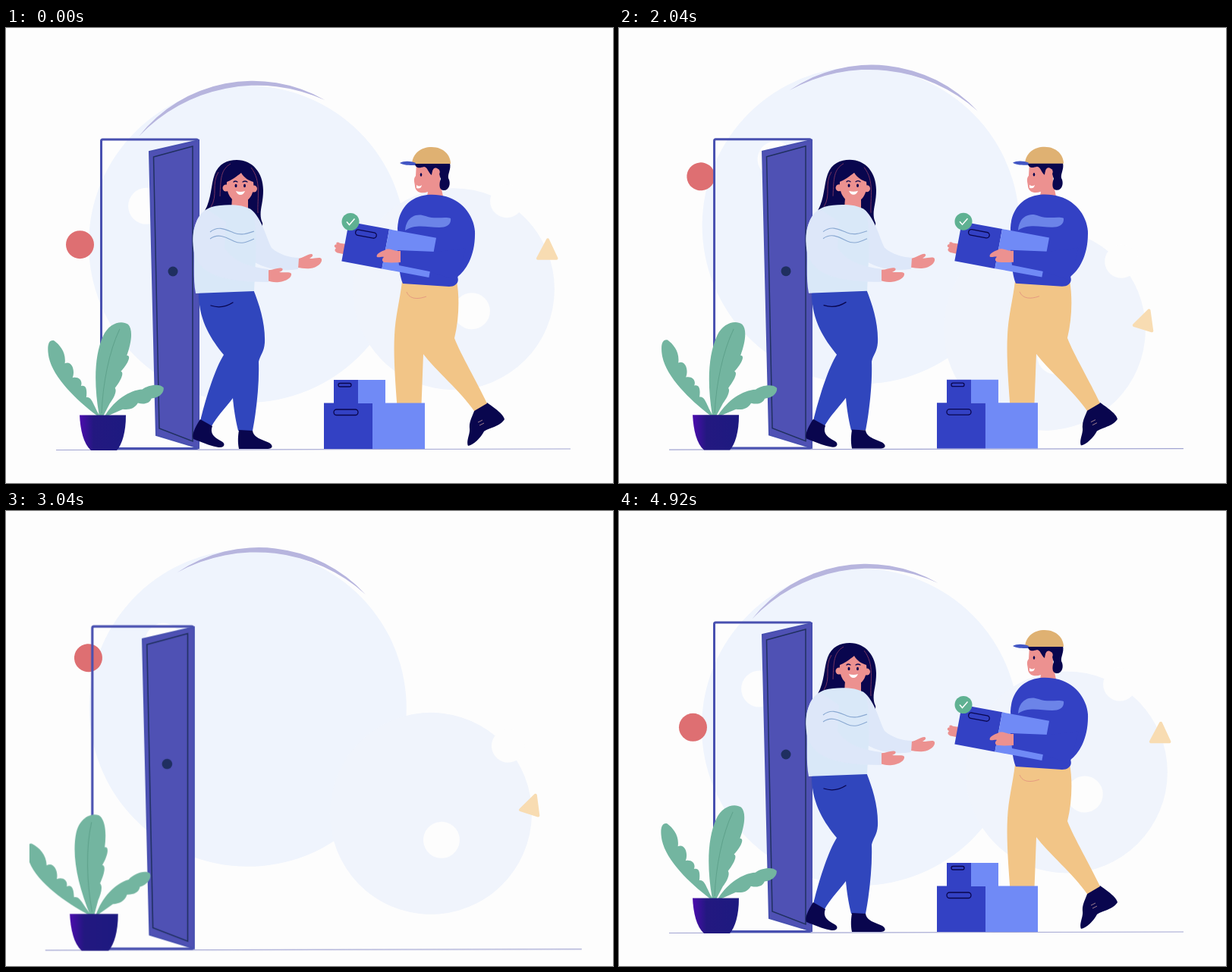
An HTML page for the animation above (4960 ms loop, 800x600 px).

```html
<!DOCTYPE html>
<html lang="en">
<head>
<meta charset="utf-8">
<title>Delivery at the door</title>
<style>
html, body { margin: 0; width: 100%; height: 100%; overflow: hidden; background: #fdfdfd; }
svg { display: block; width: 100%; height: 100%; }
.skin { fill: #ec9190; }
.navy { fill: #09064e; }
.line { fill: none; stroke: #09064e; stroke-width: 1.3; stroke-linecap: round; }
.leaf { fill: #73b5a0; }
.rib { fill: none; stroke: #5fa28c; }
.dark { fill: #3341c4; }
.light { fill: #708af6; }
.knit { fill: #d9e8f8; }
.sleeve { fill: #dde7f9; }
</style>
</head>
<body>
<svg viewBox="0 0 800 600">
  <defs>
    <linearGradient id="potFill">
      <stop offset="0" stop-color="#4c0cae"/>
      <stop offset=".3" stop-color="#231880"/>
      <stop offset="1" stop-color="#1d1a80"/>
    </linearGradient>
    <clipPath id="artboard"><rect x="46" y="-300" width="708" height="1200"/></clipPath>
  </defs>

  <g id="backdrop">
    <circle cx="318" cy="285" r="209" fill="#eff4fd"/>
    <circle cx="590" cy="344" r="133" fill="#f0f4fc"/>
    <g fill="#fdfdfd">
      <circle cx="185" cy="235" r="24"/>
      <circle cx="614" cy="373" r="24"/>
      <circle cx="660" cy="228" r="22"/>
    </g>
    <path d="M175 143A191 191 0 0 1 420 95A215 215 0 0 0 175 143Z" fill="#b7b5de"/>
    <circle cx="97.500" cy="286" r="18.500" fill="#de6f72"/>
    <path d="M714 279L701 303.500H725.500Z" fill="#f8dcb2" stroke="#f8dcb2" stroke-width="4" stroke-linejoin="round"/>
  </g>

  <g id="next"><g clip-path="url(#artboard)"><use href="#setting"/></g></g>

  <g id="scene"><g clip-path="url(#artboard)">
    <g id="setting">
      <path d="M66 556.500L744 555" stroke="#a2a5d2" stroke-width="1.2"/>
      <rect x="125.500" y="147" width="127.500" height="407.500" rx="2" fill="none" stroke="#4850b0" stroke-width="3"/>
      <path d="M189 163L254 148V554L198 537Z" fill="#4f51b4" stroke="#4850b0" stroke-width="2"/>
      <path d="M194.500 170L246 156V545L202 528Z" fill="none" stroke="#203060" stroke-width="1.500"/>
      <circle cx="220" cy="321" r="6.500" fill="#1f2f60"/>
    </g>

    <g id="woman">
      <g id="farHand"><path class="skin" d="M-2 -6C6 -6 10 -12 17 -12C20 -10 17 -8 14 -6C22 -6 29 -9 30 -5C31 0 24 6 15 7C8 8 3 6 -2 6Z"/></g>
      <g id="womanHead">
        <path class="navy" d="M262 241C271 225 270 206 275 193C280 179 292 174 304 174C325 174 339 191 339 214C339 234 332 244 338 257C339 262 335 265 328 262C315 258 304 247 290 238Z"/>
        <path d="M280 190C270 206 280 220 270 236M323 184C337 202 331 224 332 244M296 179C283 187 283 198 282 222" fill="none" stroke="#743360" stroke-width="1"/>
        <path class="skin" d="M298 224H319V239C313 244 304 243 297 238Z"/>
        <circle class="skin" cx="290" cy="211" r="4.500"/>
        <circle class="skin" cx="326.500" cy="212" r="4.500"/>
        <path class="skin" d="M291 203C301 199 307 193 310 191C314 198 320 201 326 203C328 219 320 230 309 230C297 230 290 218 291 203Z"/>
        <g class="navy"><ellipse cx="303" cy="208" rx="1.500" ry="2.200"/><ellipse cx="314.500" cy="208" rx="1.500" ry="2.200"/></g>
        <path class="line" d="M300 203Q302 201 305 203M312 203Q315 201 318 203"/>
        <path d="M303 215Q309 217 315 215Q313 220 309 220Q305 220 303 215Z" fill="#fff"/>
      </g>
      <path id="farArm" class="sleeve"/>
      <path fill="#3046bd" d="M254 346L326 345C334 365 342 390 341 415C340 428 335 431 333 440C334 470 330 505 325 531L306 531C302 515 300 500 299 488C290 500 278 512 271 525L256 518C263 490 275 450 287 431C270 410 253 385 254 346Z"/>
      <path class="line" d="M270 366Q285 371 299 362"/>
      <path class="navy" d="M256 516L272 525C268 535 275 540 284 545C290 548 288 554 280 553C268 551 255 545 247 542C244 537 250 525 256 516Z"/>
      <path class="navy" d="M307 530L325 531C326 540 338 543 347 547C353 551 351 555 345 555H307C305 545 306 537 307 530Z"/>
      <path class="knit" d="M271 236C286 232 312 232 322 239C332 250 330 290 327 347L250 350C246 330 249 305 247 285C244 263 254 242 271 236Z"/>
      <g id="nearHand"><path class="skin" d="M-2 -7C6 -6 12 -11 18 -9C20 -7 17 -5 14 -4C21 -3 28 -5 30 -2C31 3 23 8 14 9C7 10 2 8 -2 7Z"/></g>
      <path id="nearArm" class="sleeve"/>
      <path d="M269 269C280 260 290 266 300 270S318 271 327 268M269 278C280 270 290 276 300 281S318 282 327 278" fill="none" stroke="#8aa9d2" stroke-width="1.100"/>
    </g>

    <g id="man">
      <g id="gripFar"><path class="skin" d="M10 -7L-2 -7C-5 -9 -8 -7 -6 -5C-10 -4 -9 -1 -6 0C-9 3 -6 6 -2 6L10 7Z"/></g>
      <path class="navy" d="M517 529H544C546 540 544 554 543 554H487C483 549 492 543 505 540Z"/>
      <path class="navy" d="M618 502L634 494C642 500 655 508 657 516C652 525 635 528 630 532C626 540 616 550 609 551C606 545 612 535 611 528C610 518 616 510 618 502Z"/>
      <path d="M622 520L628 517M624 524L630 521" stroke="#a08090" stroke-width="1"/>
      <path fill="#f2c587" d="M522 334H594C598 355 597 385 591 409C600 432 620 465 634 495L617 505C600 480 565 450 550 430C549 455 548 490 546 532H518C515 490 510 440 512 405C513 380 519 360 522 334Z"/>
      <path d="M528 348C532 358 543 358 554 354" fill="none" stroke="#e59a80" stroke-width="1"/>
      <g id="manHead">
        <path class="skin" d="M541 178H572V203L576 222H555L556 216C548 219 540 217 539 209C539 204 536 200 540 195Z"/>
        <path class="navy" d="M538 178H585C587 186 582 192 583 198C587 205 584 215 576 214C570 213 571 204 573 199C571 194 571 188 568 185C563 183 562 188 561 194C556 190 556 184 551 183C546 184 541 187 538 178Z"/>
        <circle class="skin" cx="567" cy="190" r="4.800"/>
        <ellipse class="navy" cx="547" cy="193.500" rx="1.300" ry="2.200"/>
        <path d="M541 207Q545 210 548 207Q547 213 541 211Z" fill="#fff"/>
        <path d="M535 179C536 165 547 157 561 157C577 157 586 168 586 179Z" fill="#dfb172"/>
        <path d="M519 178C524 175 533 175 540 178L539 181C531 181 524 181 519 178Z" fill="#4256c4"/>
      </g>
      <g id="torso">
        <path class="dark" d="M516 264C517 241 530 223 555 220C590 217 615 238 618 268C619 300 606 320 595 328C598 336 592 341 584 341L523 337C516 320 517 290 516 264Z"/>
        <path fill="#6c84e8" d="M526 267C527 250 540 243 553 248C567 253 578 248 586 251C587 259 581 263 571 263C555 263 540 258 526 267Z"/>
      </g>
      <g id="parcel">
        <rect class="dark" width="54" height="53"/>
        <rect class="light" x="54" width="63" height="53"/>
        <rect class="line" x="11" y="8" width="28" height="7.500" rx="3.700"/>
      </g>
      <path id="manArm" class="dark"/>
      <g id="gripNear"><path class="skin" d="M16 -7C7 -6 1 -12 -5 -8C-11 -6 -17 -2 -15 1C-12 2 -8 0 -6 1C-10 5 -8 8 -3 8C4 9 10 8 16 8Z"/></g>
      <g id="badge">
        <circle r="11.500" fill="#5fb192"/>
        <path d="M-5 0L-1.500 4L5.500 -4" fill="none" stroke="#fff" stroke-width="1.500"/>
      </g>
    </g>

    <g id="boxes">
      <path class="dark" d="M432 464H464V495H432ZM419 494.500H483V555H419Z"/>
      <path class="light" d="M464 464H500V495H464ZM483 494.500H552V555H483Z"/>
      <rect class="line" x="438" y="468.500" width="17" height="4.500" rx="2.200"/>
      <rect class="line" x="432" y="503" width="32" height="7.500" rx="3.700"/>
    </g>

    <g id="plant">
      <path id="leafLeft" class="leaf" d="M121 512C95 492 63 462 57 434C54 418 57 410 64 412C72 418 80 428 78 442C87 438 92 451 88 461C96 459 102 465 99 472C107 470 107 479 106 487C114 486 115 498 124 512Z"/>
      <g id="leafMain">
        <path class="leaf" d="M123 512C116 470 117 432 129 406C137 389 153 385 162 391C169 398 166 416 160 432C167 432 160 445 152 453C157 455 151 466 144 475C147 479 142 489 137 495L128 512Z"/>
        <path class="rib" d="M126 508C128 470 136 428 151 397"/>
      </g>
      <path id="leafRight" class="leaf" d="M130 512C142 492 162 478 180 477C188 471 203 469 208 475C209 482 202 488 192 489C189 496 182 497 174 495C169 503 162 504 154 503L133 512Z"/>
      <path fill="url(#potFill)" d="M97 510.500H158C158 533 153 549 146 557H112C102 548 98 530 97 510.500Z"/>
    </g>
  </g></g>
</svg>

<script>
const LOOP = 4960;
const el = Object.fromEntries([...document.querySelectorAll('[id]')].map(n => [n.id, n]));
const svg = document.querySelector('svg');
const lerp = (a, b, k) => a + (b - a) * k;
const clamp = x => Math.min(1, Math.max(0, x));
const smooth = x => { x = clamp(x); return x * x * (3 - 2 * x); };
const place = (n, x, y, r = 0, s = 1) =>
  n.setAttribute('transform', `translate(${x} ${y}) rotate(${r}) scale(${s})`);
const turn = (n, r, x, y) => n.setAttribute('transform', `rotate(${r} ${x} ${y})`);

// Reaching pose first, resting pose second.
const arms = {
  nearArm: ['M265 239C247 247 243 280 249 300C258 325 285 335 346 335L346 318C320 315 300 308 288 290L290 256Z',
            'M265 239C248 247 243 285 246 310C247 330 262 345 278 357L292 349C284 335 280 320 280 300L280 256Z'],
  farArm: ['M321 238C337 248 344 280 350 290C360 299 375 303 386 303L385 318C365 321 345 319 326 308Z',
           'M321 238C331 250 329 280 329 290C329 310 330 325 329 343L325 345C320 330 318 310 322 300Z'],
  manArm: ['M516 293L566 295L606 290L594 333L558 321L518 313Z',
           'M544 324L578 309L615 290L606 324L590 333L546 337Z']
};
const hands = {
  nearHand: [[346, 326, 0], [285, 356, 55]],
  farHand: [[386, 310, 0], [322, 339, 58]],
  gripNear: [[504, 301, 0], [531, 335, -12]],
  gripFar: [[441, 291, 8], [468, 349, -12]],
  parcel: [[452, 255.500, 10.500], [465, 311, -10.700]]
};
const mixPath = ([a, b], k) => {
  const other = b.match(/[\d.]+/g);
  let i = 0;
  return a.replace(/[\d.]+/g, n => lerp(+n, +other[i++], k).toFixed(2));
};

function addBlur(node) {
  const ns = 'http://www.w3.org/2000/svg';
  const filter = document.createElementNS(ns, 'filter');
  const gauss = document.createElementNS(ns, 'feGaussianBlur');
  const box = { id: node.id + 'Blur', filterUnits: 'userSpaceOnUse', x: -200, y: -200,
    width: 1300, height: 1000, 'color-interpolation-filters': 'sRGB' };
  for (const key in box) filter.setAttribute(key, box[key]);
  filter.append(gauss);
  svg.querySelector('defs').append(filter);
  return (x, y) => {
    if (x + y < 0.4) return node.removeAttribute('filter');
    gauss.setAttribute('stdDeviation', `${Math.min(x, 9)} ${Math.min(y, 14)}`);
    node.setAttribute('filter', `url(#${node.id}Blur)`);
  };
}
const blur = {};
for (const id of ['scene', 'next', 'woman', 'man', 'boxes']) blur[id] = addBlur(el[id]);

const DEPART = 1990, SWAP = 2490, ARRIVED = 3420;
const travel = t => {
  if (t < DEPART) return 0;
  if (t < SWAP) return 0.5 * ((t - DEPART) / (SWAP - DEPART)) ** 3;
  return t > ARRIVED ? 1 : 1 - 0.5 * Math.exp((SWAP - t) / 170);
};

function stage(id, t, leaving) {
  const p = travel(t);
  const y = 600 * (leaving ? -p : 1 - p);
  const s = leaving ? 1 - 0.48 * p : 1 + 0.000113 * Math.max(0, ARRIVED - t);
  el[id].setAttribute('transform', `translate(400 ${300 + y}) scale(${s}) translate(-400 -300)`);
  blur[id](0, 150 * Math.abs(travel(t + 20) - travel(t - 20)));
}

const slide = (t, reach) => reach * (Math.max(0, 3900 - t) / 480) ** 3;
function enter(id, t, reach, entering) {
  place(el[id], entering ? slide(t, reach) : 0, 0);
  blur[id](entering ? Math.abs(slide(t + 20, reach) - slide(t - 20, reach)) / 4 : 0, 0);
  el[id].style.display = entering && t < 2950 ? 'none' : '';
}

function draw(t) {
  turn(el.backdrop, 9.7 * (1 - Math.cos(2 * Math.PI * (t - 90) / LOOP)), 399, 275);

  const entering = t >= 2660;
  stage('scene', t, !entering);
  el.next.style.display = t > 2200 && !entering ? '' : 'none';
  if (t > 2200 && !entering) stage('next', t, false);

  enter('woman', t, -86, entering);
  enter('man', t, 64, entering);
  enter('boxes', t, 265, entering);

  const sway = t < SWAP
    ? 7 * Math.cos(Math.PI / 2 * (t - 1050) / 1000)
    : -4 - 9 * Math.cos(2 * Math.PI * (t - 3000) / 6100);
  turn(el.leafMain, sway, 126, 512);
  turn(el.leafLeft, sway * 0.68, 120, 512);
  turn(el.leafRight, sway * 0.95, 130, 512);

  const rest = entering ? 1 - smooth((t - 3940) / 460) : 0;
  for (const id in arms) el[id].setAttribute('d', mixPath(arms[id], rest));
  for (const id in hands) {
    const [a, b] = hands[id];
    place(el[id], ...a.map((v, i) => lerp(v, b[i], rest)));
  }
  turn(el.womanHead, -7 * rest, 308, 240);
  turn(el.manHead, 15 * rest, 565, 215);
  el.torso.setAttribute('transform', `translate(567 0) scale(${1 + 0.06 * rest} 1) translate(-567 0)`);
  place(el.badge, 454, 255.500, 0, entering ? smooth((t - 4320) / 240) : 1);
}

// The plant travels with the arriving room as well.
const plantCopy = document.createElementNS('http://www.w3.org/2000/svg', 'use');
plantCopy.setAttribute('href', '#plant');
el.next.firstElementChild.append(plantCopy);

const start = performance.now();
(function tick() {
  draw((performance.now() - start) % LOOP);
  requestAnimationFrame(tick);
})();
</script>
</body>
</html>
```
